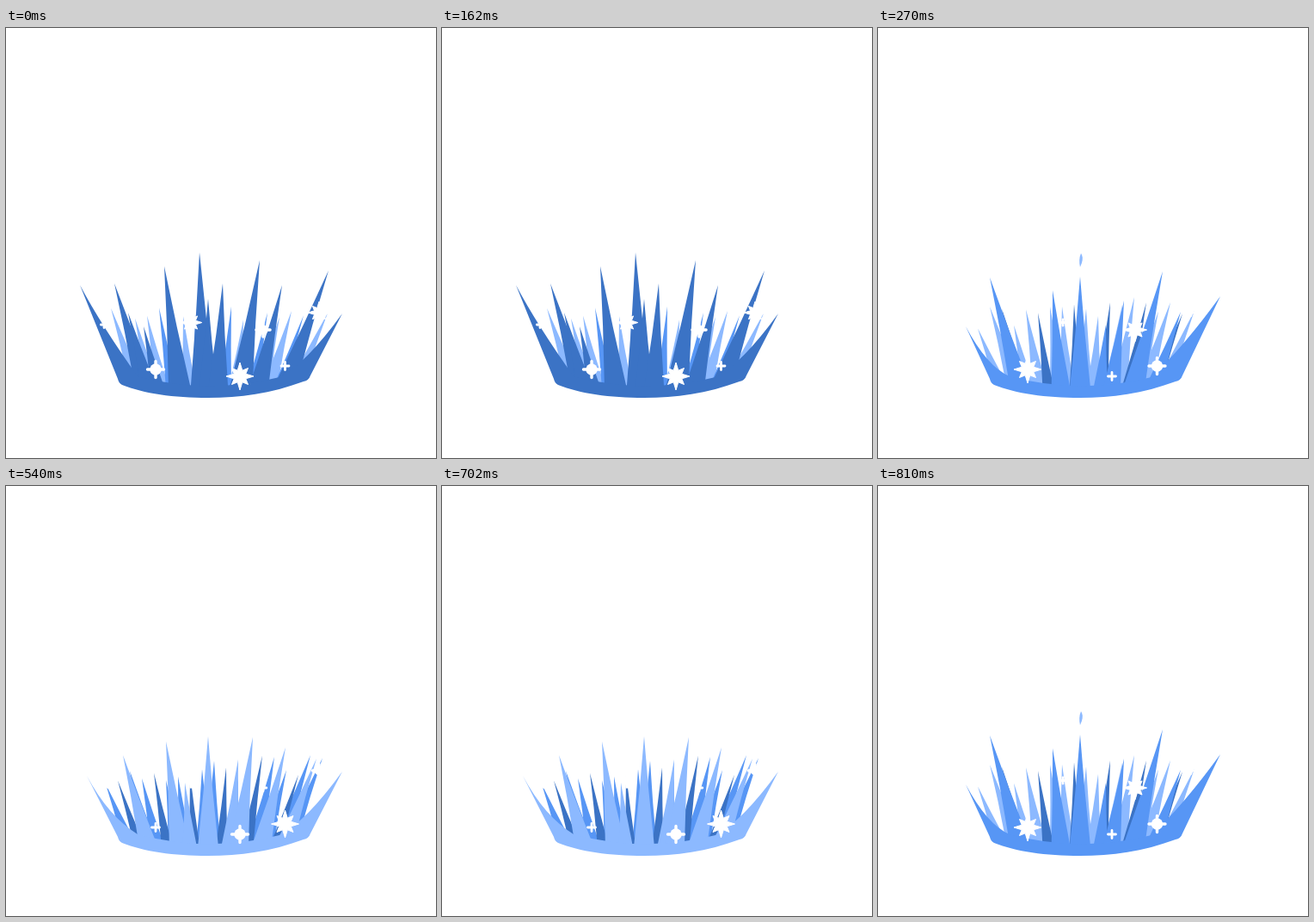
These frames come from a looping animation (500x500 px, 1080 ms). An HTML page:

```html
<!DOCTYPE html>
<html lang="en">
<head>
<meta charset="utf-8">
<title>Ice crystals</title>
<style>
html, body { margin: 0; width: 100%; height: 100%; overflow: hidden; background: #fff; }
svg { display: block; width: 100%; height: 100%; }
</style>
</head>
<body>
<svg id="stage" viewBox="0 0 500 500"></svg>
<script>
const DARK = '#3b73c5', MID = '#5796f5', LIGHT = '#8cb9ff';
const STEP = 270, SPACING = 14;
const HUB = { x: 235, y: 665 };
const stage = document.getElementById('stage');

const rim = x => 417 - (x - HUB.x) ** 2 / 800;
const path = (d, fill) => `<path fill="${fill}" d="${d}"/>`;

function seeded(seed) {
  return () => (seed = seed * 16807 % 2147483647) / 2147483647;
}

// All shards lean away from one hub below the crown.
function shard(x, y, fill, slim = 1) {
  const foot = HUB.x + (x - HUB.x) * (HUB.y - 411) / (HUB.y - y);
  const base = rim(foot), half = slim * (3 + (base - y) * .07);
  const cx = (x + foot) / 2, cy = (y + base) / 2, waist = half * .4;
  return path(`M${foot - half} ${base + 1}Q${cx - waist} ${cy} ${x} ${y}
    Q${cx + waist} ${cy} ${foot + half} ${base + 1}Z`, fill);
}

function backRow(phase, fill, accent) {
  const random = seeded(phase);
  let under = '', over = '';
  for (let k = -2; phase + k * SPACING < 380; k++) {
    const x = phase + k * SPACING;
    const y = 349 - .06 * (x - 120) - 26 * random();
    if (x < 115) continue;
    if (k % 3) under += shard(x, y, fill, .95);
    else over += shard(x, y, accent, .72);
  }
  return under + over;
}

const bowl = ([lx, ly], [rx, ry], fill) => path(`M130 408L${lx} ${ly}
  Q${lx + 25} ${ly + 47} 153 405Q235 427 318 406Q${rx - 42} ${ry + 58} ${rx} ${ry}
  L354 404Q352 410 346 411C308 425 272 430 235 430C195 430 160 425 135 415Q131 413 130 408Z`, fill);

function burst(x, y, size) {
  const r = 16 * size;
  let d = '';
  for (let i = 0; i < 16; i++) {
    const a = i * Math.PI / 8;
    const k = i % 2 ? r * .46 : i % 4 ? r * .84 : r;
    d += `${i ? 'L' : 'M'}${x + k * Math.cos(a)} ${y + k * Math.sin(a)}`;
  }
  return `<path d="${d}Z" fill="#fff" stroke="#fff" stroke-linejoin="round"/>`;
}

function cross(x, y, r, w) {
  return `<path d="M${x - r} ${y}h${2 * r}M${x} ${y - r}v${2 * r}"
    stroke="#fff" stroke-width="${w}" stroke-linecap="round"/>`;
}

const plus = (x, y, size) => cross(x, y, 4.5 * size, 2.8);
const twinkle = (x, y, size) => cross(x, y, 9.5 * size, 3.4) +
  `<circle cx="${x}" cy="${y}" r="${6.7 * size}" fill="#fff"/>`;

// x, y, size, place in the twinkle cycle
const glints = [
  [174, 397, 1, 0], [272, 405, 1, 1], [324.5, 393, 1, 2],
  [299, 351, .85, 0], [215, 342.5, .8, 1], [114, 345, .8, 2], [364, 331, .8, 1]
];
const cycle = [twinkle, burst, plus];

const crowns = [
  { front: DARK, fill: LIGHT, accent: MID, phase: 136,
    left: [86, 299], right: [391, 332],
    tips: [[126, 297], [142, 331], [160, 347], [184, 277], [225, 261], [235, 315],
      [252, 297], [295, 270], [321, 299], [375, 282]] },
  { front: MID, fill: LIGHT, accent: DARK, phase: 144,
    left: [102, 347], right: [398, 312],
    tips: [[130, 290], [203, 305], [235, 289], [265, 345], [286, 317], [331, 283], [352, 330]],
    extra: path('M236 262Q239 266 237 273L235 278Q233 269 236 262Z', LIGHT) },
  { front: LIGHT, fill: MID, accent: DARK, phase: 130,
    left: [94, 337], right: [391, 332],
    tips: [[136, 313], [186, 297], [208, 345], [235, 291], [270, 318], [287, 292],
      [325, 304], [361, 317]] }
];

const poses = crowns.map((c, pose) =>
  backRow(c.phase, c.fill, c.accent) +
  c.tips.map(([x, y]) => shard(x, y, c.front)).join('') +
  bowl(c.left, c.right, c.front) +
  glints.map(([x, y, size, turn]) => cycle[(turn + pose) % 3](x, y, size)).join('') +
  (c.extra || ''));

const order = [0, 1, 2, 1];
const start = performance.now();
let shown = -1;

function draw(now) {
  const pose = order[Math.floor(Math.max(0, now - start) / STEP) % order.length];
  if (pose !== shown) stage.innerHTML = poses[shown = pose];
  requestAnimationFrame(draw);
}
draw(start);
</script>
</body>
</html>
```
